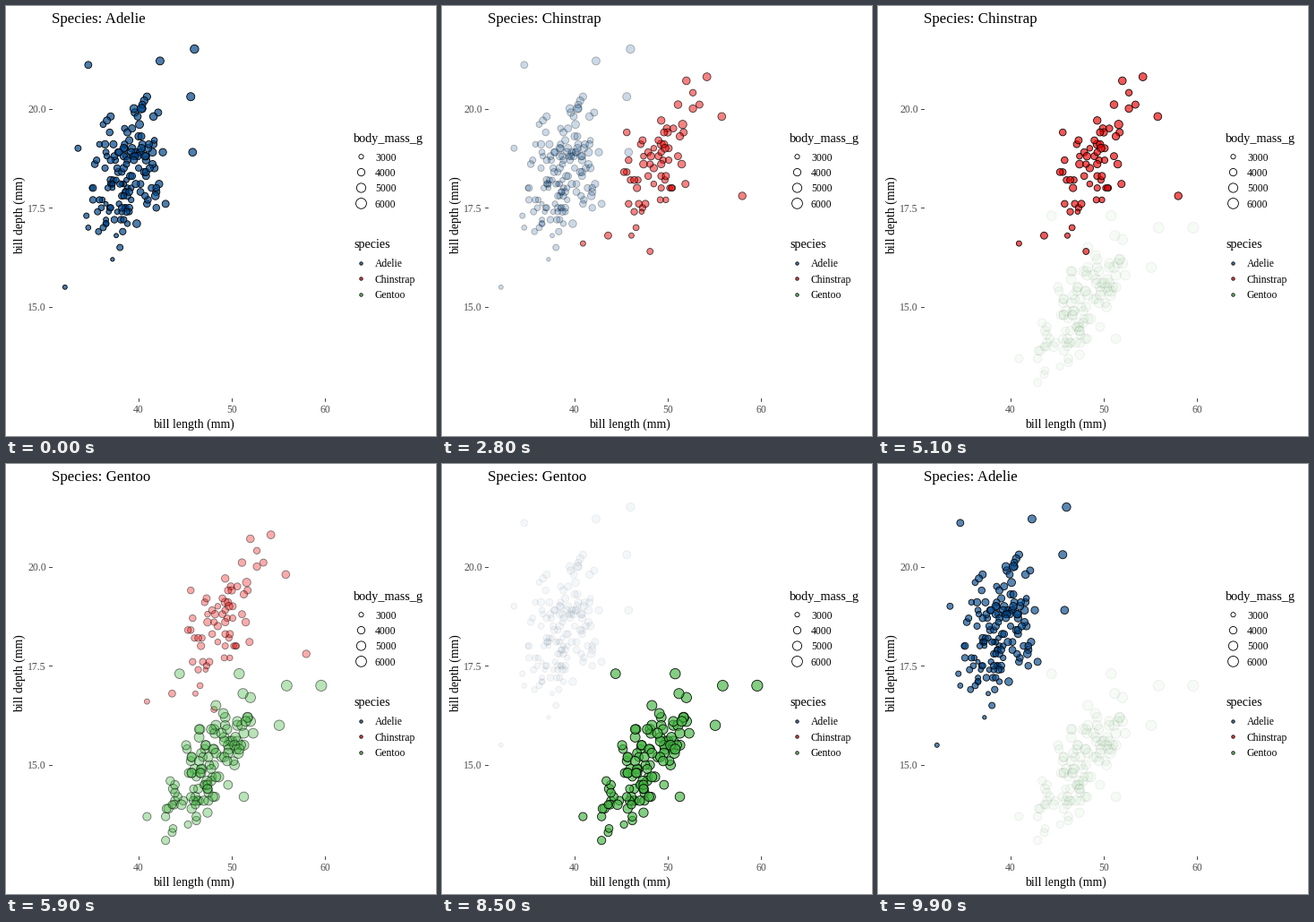
These frames come from a looping animation (480x480 px, 10 s). A matplotlib script:

```python
import numpy as np
import matplotlib.pyplot as plt
from matplotlib.animation import FuncAnimation
from matplotlib.colors import to_rgb

DPI = 80
PT = 72 / DPI              # points per pixel
FRAMES, INTERVAL = 100, 100
CYCLE, STILL, FADE = 34, 16, 17   # frames per species, at rest, in crossfade
OPACITY = 0.7
GREY = "#4d4d4d"

plt.rcParams["font.family"] = "Liberation Serif"
rng = np.random.default_rng(21)


def to_px(x, y):
    return 148 + (x - 40) * 10.4, 114.5 + (20 - y) * 44.3


def radius(mass):
    share = np.sqrt(np.clip((np.asarray(mass) - 2700) / 3600, 0, 1))
    return 0.375 * (2.845 * (0.75 + 4.65 * share) + 0.94)


fig = plt.figure(figsize=(480 / DPI, 480 / DPI), dpi=DPI, facecolor="white")
ax = fig.add_axes([0, 0, 1, 1])
ax.set_xlim(0, 480)
ax.set_ylim(480, 0)
ax.axis("off")


def label(x, y, text, px, color="black", **kw):
    return ax.text(x, y, text, fontsize=px * PT, color=color,
                   va="baseline", **kw)


def dots(x, y, r, face):
    return ax.scatter(x, y, s=(2 * r * PT) ** 2, facecolors=face,
                      edgecolors="black", linewidths=0.85 * PT, zorder=3)


def cloud(color, count, mean, sd, rho, mass, slope, edge):
    """Correlated random birds plus a few that mark the cloud's edge."""
    u, v = rng.normal(size=(2, 4 * count))
    keep = np.flatnonzero(u * u + v * v < 4.6)[:count - len(edge)]
    u, v = u[keep], v[keep]
    z = np.column_stack([u, rho * u + np.sqrt(1 - rho * rho) * v])
    core = np.round(mean + z * sd, 1)
    x, y = np.vstack([core, edge]).T
    heavy = (x - mean[0]) / sd[0] + (y - mean[1]) / sd[1]
    noise = np.append(rng.normal(0, 250, len(core)), np.zeros(len(edge)))
    return dots(*to_px(x, y), radius(mass + slope * heavy + noise), color)


# axes
for value in (40, 50, 60):
    x = to_px(value, 0)[0]
    ax.plot([x, x], [437.5, 441], color="#333333", lw=0.9 * PT)
    label(x, 453.7, str(value), 11.6, GREY, ha="center")
for value in (15.0, 17.5, 20.0):
    y = to_px(0, value)[1]
    ax.plot([47.5, 51], [y, y], color="#333333", lw=0.9 * PT)
    label(45, y + 4.5, f"{value:.1f}", 11.8, GREY, ha="right")
label(209, 471, "bill length (mm)", 13.8, ha="center")
label(18.5, 234, "bill depth (mm)", 13.8, ha="center", rotation=90,
      rotation_mode="anchor")
title = label(51, 19, "", 16.9)

# clouds
COLORS = {"Adelie": "#00468B", "Chinstrap": "#ED0000", "Gentoo": "#42B540"}
NAMES = list(COLORS)
clouds = [
    cloud(COLORS["Adelie"], 151, (38.8, 18.3), (2.2, 1.0), 0.25, 3700, 130,
          [(46.0, 21.5), (34.6, 21.1), (42.3, 21.2), (45.6, 20.3),
           (45.8, 18.9), (42.9, 17.6), (33.5, 19.0), (32.1, 15.5)]),
    cloud(COLORS["Chinstrap"], 68, (48.7, 18.4), (2.6, 0.95), 0.68, 3730, 110,
          [(54.2, 20.8), (52.0, 20.7), (55.8, 19.8), (58.0, 17.8),
           (45.6, 19.4), (48.1, 16.4), (40.9, 16.6)]),
    cloud(COLORS["Gentoo"], 123, (47.4, 15.0), (2.4, 0.85), 0.65, 5080, 160,
          [(59.6, 17.0), (55.9, 17.0), (50.8, 17.3), (44.4, 17.3),
           (55.1, 16.0), (51.3, 14.2), (40.9, 13.7), (42.9, 13.1)]),
]

# legends
label(388, 152, "body_mass_g", 14.2)
for i, mass in enumerate((3000, 4000, 5000, 6000)):
    y = 168.2 + 17.4 * i
    dots(396.5, y, radius(mass), "none")
    label(412, y + 4.4, str(mass), 11.6)
label(388, 270, "species", 14.2)
for i, name in enumerate(NAMES):
    y = 286.5 + 17.6 * i
    dots(396.3, y, 1.7, (*to_rgb(COLORS[name]), OPACITY))
    label(412, y + 4.5, name, 11.6)


def update(frame):
    now, k = divmod(frame, CYCLE)
    following = (now + 1) % 3
    k = max(0, k - STILL)
    k -= k == 8            # the fade pauses once before the title changes
    p = k / min(FADE, FRAMES - CYCLE * now - STILL)
    levels = {now: 1 - p, following: p}
    for i, dots_ in enumerate(clouds):
        level = levels.get(i, 0)
        dots_.set_facecolor((*to_rgb(COLORS[NAMES[i]]), OPACITY * level))
        dots_.set_edgecolor((0, 0, 0, level))
    title.set_text("Species: " + NAMES[following if p > 0.5 else now])
    return [title, *clouds]


anim = FuncAnimation(fig, update, frames=FRAMES, interval=INTERVAL,
                     repeat=True, repeat_delay=0, blit=False)
plt.show()
```
